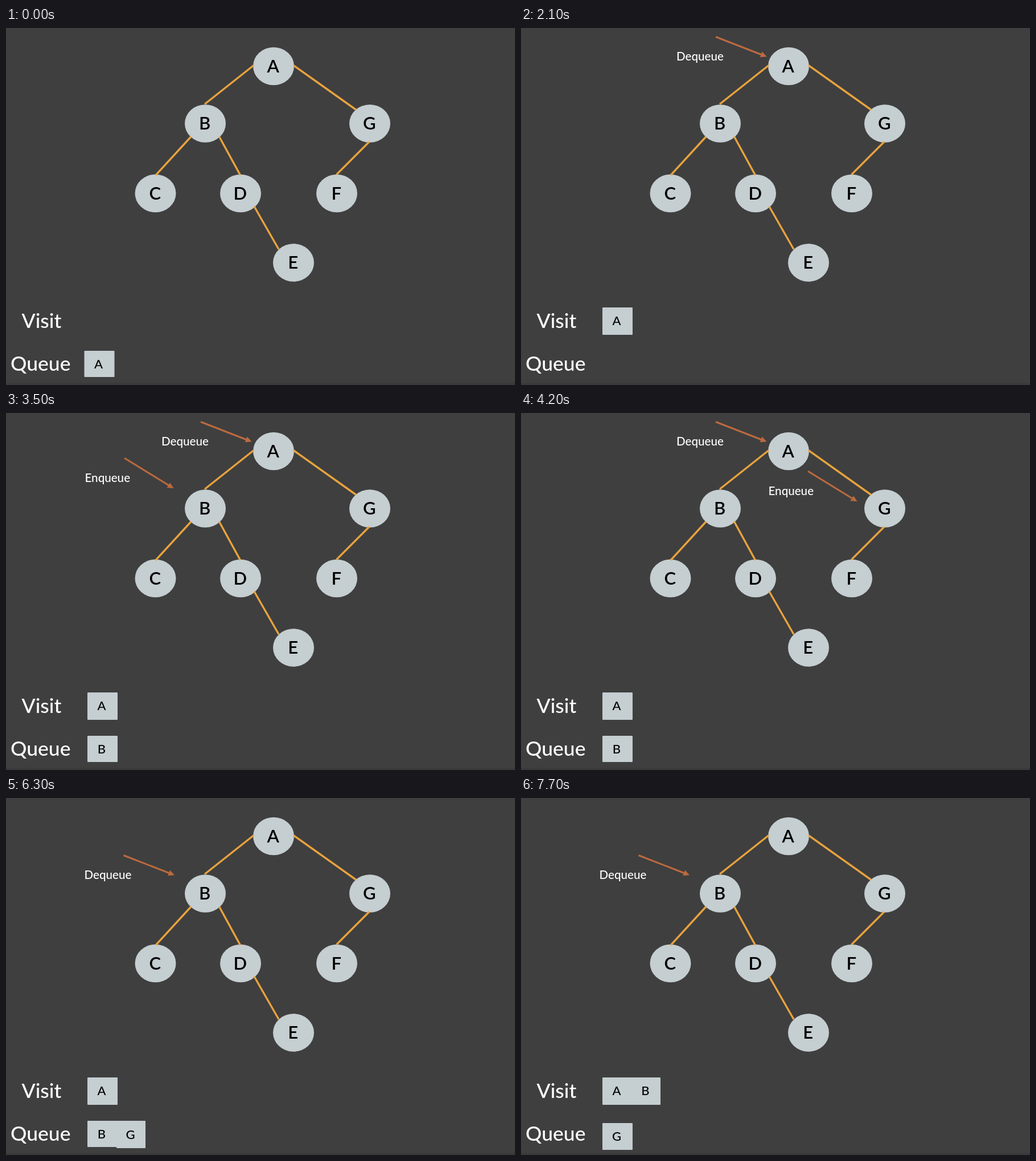
Write an HTML page that moves like this. It is 894x626 px and loops after 8000 ms.

```html
<!DOCTYPE html>
<html lang="en">
<head>
<meta charset="utf-8">
<title>Breadth-first traversal</title>
<style>
  html, body { margin: 0; width: 100%; height: 100%; overflow: hidden; background: #3f3f3f; }
  svg { display: block; width: 894px; height: 626px; font-family: Lato, "Open Sans", sans-serif; font-weight: 500; }
  .node, .box rect { fill: #c5ced1; }
  .edge { stroke: #e8a33d; stroke-width: 3.4; }
  .arrow line { stroke: #bc6a3f; stroke-width: 3; }
  .arrow path { fill: #bc6a3f; }
  .letter { font-size: 31px; font-weight: 600; text-anchor: middle; }
  .box text { font-size: 22px; text-anchor: middle; }
  .title { font-size: 35.5px; fill: #fff; }
  .arrow text { font-size: 20.6px; fill: #fff; }

  /* One step lasts 700 ms, 8.75% of the loop. */
  .step { visibility: hidden; animation: 8s step-end infinite; }
  .queue-a { animation-name: queue-a; }
  .queue-b { animation-name: queue-b; }
  .queue-g { animation-name: queue-g; }
  .front-g { animation-name: front-g; }
  .visit-a { animation-name: visit-a; }
  .visit-b { animation-name: visit-b; }
  .dequeue-a { animation-name: dequeue-a; }
  .dequeue-b { animation-name: dequeue-b; }
  .enqueue-b { animation-name: enqueue-b; }
  .enqueue-g { animation-name: enqueue-g; }
  @keyframes queue-a { 0% { visibility: visible } 17.5%, 100% { visibility: hidden } }
  @keyframes queue-b { 0%, 87.5%, 100% { visibility: hidden } 43.75% { visibility: visible } }
  @keyframes queue-g { 0%, 87.5%, 100% { visibility: hidden } 61.25% { visibility: visible } }
  @keyframes front-g { 0% { visibility: hidden } 87.5%, 100% { visibility: visible } }
  @keyframes visit-a { 0% { visibility: hidden } 26.25%, 100% { visibility: visible } }
  @keyframes visit-b { 0% { visibility: hidden } 96.25%, 100% { visibility: visible } }
  @keyframes dequeue-a { 0%, 78.75%, 100% { visibility: hidden } 8.75% { visibility: visible } }
  @keyframes dequeue-b { 0% { visibility: hidden } 78.75%, 100% { visibility: visible } }
  @keyframes enqueue-b { 0%, 52.5%, 100% { visibility: hidden } 35% { visibility: visible } }
  @keyframes enqueue-g { 0%, 70%, 100% { visibility: hidden } 52.5% { visibility: visible } }
</style>
</head>
<body>
<svg viewBox="0 0 894 626">
  <defs>
    <g id="dequeue" class="arrow">
      <line x1="342" y1="15.5" x2="423" y2="47"/>
      <path d="M431.5 50.3 L419.8 51.2 L423.6 41.6 Z"/>
      <text x="273" y="57">Dequeue</text>
    </g>
    <g id="enqueue" class="arrow">
      <line x1="208" y1="79" x2="287" y2="127.5"/>
      <path d="M294.5 132 L282.6 131 L288 122.2 Z"/>
      <text x="138.5" y="121">Enqueue</text>
    </g>
  </defs>

  <rect y="622" width="894" height="4" fill="#3a3a3a"/>
  <g id="tree"></g>

  <text class="title" x="27.5" y="525.5">Visit</text>
  <text class="title" x="8" y="600.5">Queue</text>

  <g class="step box queue-a"><rect x="137.5" y="566" width="53" height="46" rx="1"/><text x="162.5" y="596.5">A</text></g>
  <g class="step box queue-b"><rect x="143" y="566" width="53" height="46" rx="1"/><text x="168" y="596.5">B</text></g>
  <g class="step box queue-g"><rect x="194" y="566" width="51" height="48" rx="1"/><text x="218.5" y="597.5">G</text></g>
  <g class="step box front-g"><rect x="143" y="570" width="53" height="47" rx="1"/><text x="168" y="601">G</text></g>
  <g class="step box visit-a"><rect x="143" y="490" width="53" height="48" rx="1"/><text x="168" y="520.5">A</text></g>
  <g class="step box visit-b"><rect x="194" y="490" width="51" height="48" rx="1"/><text x="218.5" y="520.5">B</text></g>

  <use class="step dequeue-a" href="#dequeue"/>
  <use class="step dequeue-b" href="#dequeue" x="-135.5" y="85"/>
  <use class="step enqueue-b" href="#enqueue"/>
  <use class="step enqueue-g" href="#enqueue" x="296" y="23"/>
</svg>
<script>
  const tree = document.getElementById("tree");

  function add(tag, attrs, text = "") {
    const el = document.createElementNS("http://www.w3.org/2000/svg", tag);
    for (const key in attrs) el.setAttribute(key, attrs[key]);
    el.textContent = text;
    tree.append(el);
  }

  const nodes = {
    A: [470, 67], B: [350, 167.5], G: [639, 167.5], C: [262.5, 290],
    D: [412, 290], F: [581, 290], E: [505, 411.5]
  };
  const edges = [
    [435, 65.5, 349, 133.5], [505, 65.5, 615, 143.5], [325, 190.5, 263, 258],
    [374.5, 190.5, 411.5, 258], [638, 199.5, 580.5, 257], [436, 313, 479, 388]
  ];

  for (const [name, [cx, cy]] of Object.entries(nodes)) {
    add("ellipse", { class: "node", cx, cy, rx: 36, ry: 33.2 });
    add("text", { class: "letter", x: cx - 0.8, y: cy + 10.7 }, name);
  }
  for (const [x1, y1, x2, y2] of edges) add("line", { class: "edge", x1, y1, x2, y2 });
</script>
</body>
</html>
```
